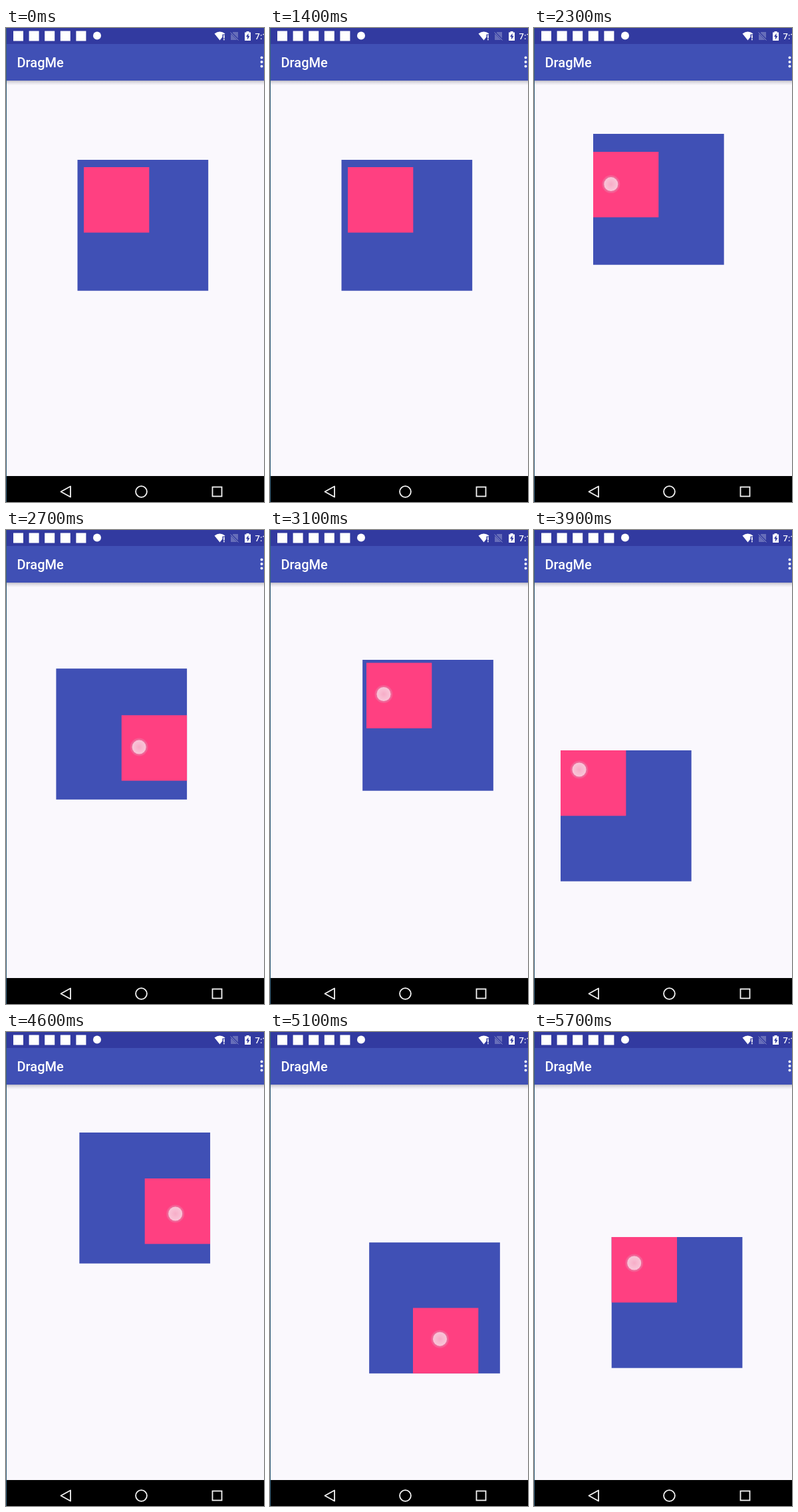
An HTML page for the animation above (5800 ms loop, 388 by 712 pixels).

```html
<!DOCTYPE html>
<html lang="en">
<head>
<meta charset="utf-8">
<title>Drag demo</title>
<style>
html, body { margin: 0; width: 100%; height: 100%; overflow: hidden; background: #faf8fd; }
svg { display: block; }
text { font-family: Roboto, Arial, sans-serif; font-weight: 500; fill: #fff; }
</style>
</head>
<body>
<svg width="388" height="712" viewBox="0 0 388 712">
  <defs>
    <linearGradient id="shade" x2="0" y2="1">
      <stop stop-color="#bebcc6"/>
      <stop offset=".4" stop-color="#e0dee5"/>
      <stop offset="1" stop-color="#faf8fd"/>
    </linearGradient>
    <radialGradient id="spot">
      <stop stop-color="#fff" stop-opacity=".45"/>
      <stop offset="1" stop-color="#fff" stop-opacity=".62"/>
    </radialGradient>
  </defs>
  <rect width="388" height="712" fill="#faf8fd"/>
  <rect y="79" width="388" height="7" fill="url(#shade)"/>
  <rect id="outer" width="196.700" height="196.700" fill="#4050b5"/>
  <rect id="inner" width="98.350" height="98.350" fill="#ff4081"/>

  <!-- status bar and toolbar -->
  <rect width="388" height="24" fill="#323aa0"/>
  <rect y="24" width="388" height="55" fill="#4050b5"/>
  <path d="M11 12H120.400" stroke="#fff" stroke-width="15" stroke-dasharray="15 8.600"/>
  <g fill="#fff">
    <circle cx="137" cy="11.500" r="6"/>
    <path d="M313.500 8.500Q321.500 2.500 329.500 8.500L328.500 9.500H325.500V13.500L321.500 18.500ZM327 10.500h1.700v5H327zM327 16.500h1.700v1.800H327z"/>
    <path fill-rule="evenodd" d="M359 6.500h2.500V5h4v1.500H368V19h-9zM364.500 8l-3.500 5h2v4.500l3.500-5.500h-2z"/>
  </g>
  <path d="M384.500 44.500V58" stroke="#fff" stroke-width="4" stroke-linecap="round" stroke-dasharray="0 6.500"/>
  <path d="M341.500 6H349V18H338V9.500Z" fill="#676eb9"/>
  <path d="M337 5.500L350 18.500" stroke="#323aa0" stroke-width="2.500"/>
  <path d="M337.500 6.500L349.500 18.500" stroke="#8b90cb"/>
  <text x="374.500" y="16.500" font-size="13">7:12</text>
  <text x="16.500" y="58.500" font-size="20">DragMe</text>

  <!-- navigation bar -->
  <rect y="673" width="388" height="39"/>
  <g fill="none" stroke="#f4f4f4" stroke-width="1.800">
    <path d="M97 688.500V704.500L82.500 696.500Z" stroke-linejoin="round"/>
    <circle cx="203.500" cy="696.500" r="8.400"/>
    <rect x="310.500" y="689.500" width="14" height="14"/>
  </g>
  <rect width="1" height="712" fill="#35617c"/>
  <g id="touch">
    <circle r="13.500" fill="#d0c4d0" opacity=".2"/>
    <circle r="12" fill="#d0c4d0" opacity=".15"/>
    <circle r="10.500" fill="url(#spot)"/>
  </g>
</svg>
<script>
const STEP = 100, LOOP = 5800;
const TOUCH = 6, LIFT = 14, GRAB = 21;
const OUTER = 196.7, INNER = OUTER / 2;
const $ = id => document.getElementById(id);

// Key points: step, x, y
const roam = [[6, 137, 226], [11, 192, 309], [13, 268, 382], [17, 83, 61], [18, 18, 53], [20, 366, 100]];
const drag = [
  [20, 117, 209], [22, 93, 159], [23, 89, 186], [25, 72, 250], [26, 110, 306.5],
  [28, 237.5, 250], [30, 180, 195], [31, 145, 199.5], [35, 124, 410.5],
  [37, 90, 443.5], [39, 40, 331], [41, 36.5, 266], [44, 120, 151],
  [46, 208.7, 220], [48, 247.5, 310], [51, 215, 414.5], [57, 116.7, 308]
];
// Finger's offset from the inner square's corner
const grip = [[21, 27, 49], [31, 26, 47], [39, 28, 29], [46, 46, 53], [57, 34, 39]];

function along(keys, step) {
  const i = Math.max(1, keys.findIndex(k => k[0] >= step));
  const [t, ...a] = keys[i - 1], [end, ...b] = keys[i];
  return a.map((v, n) => v + (b[n] - v) * (step - t) / (end - t));
}

// The inner square pushes the outer one along whenever it meets an edge
const push = (outer, inner) => Math.min(inner, Math.max(inner + INNER - OUTER, outer));

function pose(step) {
  let outer = [107.5, 198], inner = [117, 209], touch = null;
  if (step >= TOUCH && step < GRAB && step !== LIFT) touch = along(roam, step);
  for (let s = GRAB; s <= step; s++) {
    inner = along(drag, s);
    outer = outer.map((v, n) => push(v, inner[n]));
    touch = along(grip, s).map((v, n) => v + inner[n]);
  }
  return { outer, inner, touch };
}

function draw(now) {
  const parts = pose(Math.floor(now % LOOP / STEP));
  for (const id in parts) {
    const p = parts[id];
    $(id).setAttribute("visibility", p ? "visible" : "hidden");
    if (p) $(id).setAttribute("transform", `translate(${p})`);
  }
}

let start;
function tick(now) {
  start ??= now;
  draw(now - start);
  requestAnimationFrame(tick);
}
draw(0);
requestAnimationFrame(tick);
</script>
</body>
</html>
```
